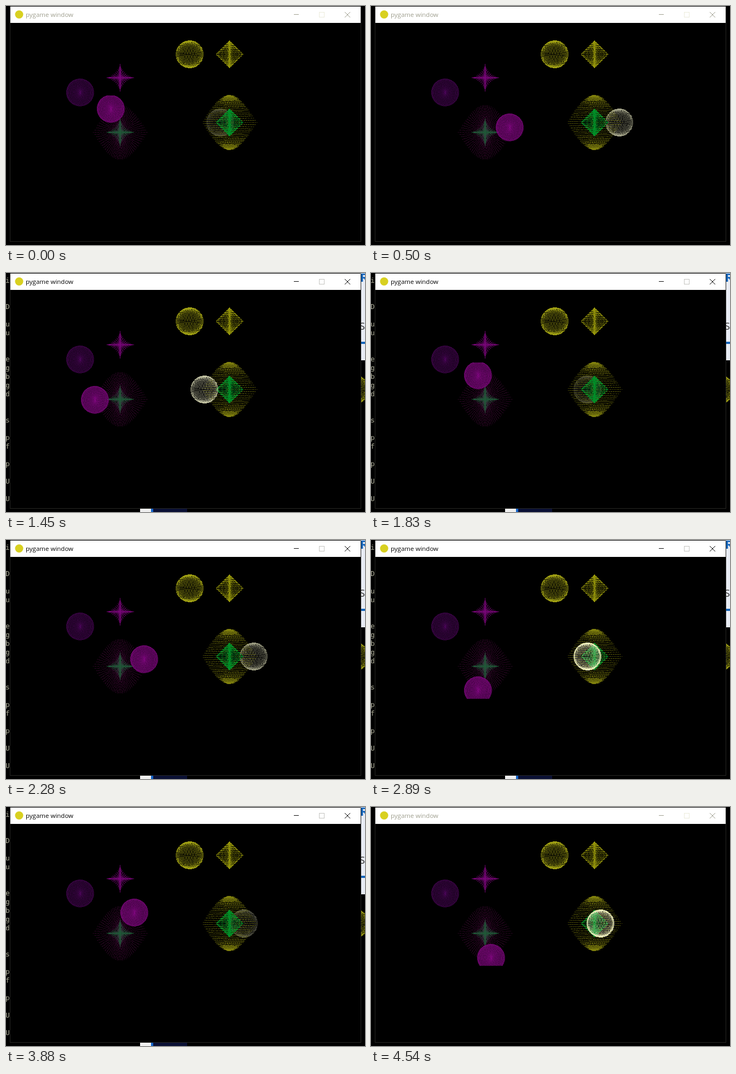
These frames come from a looping animation (656x438 px, 4.58 s). An HTML page with a canvas:

```html
<!DOCTYPE html>
<html lang="en">
<head>
<meta charset="utf-8">
<title>pygame window</title>
<style>
  html, body { margin: 0; width: 100%; height: 100%; overflow: hidden; background: #000; }
  canvas { display: block; }
</style>
</head>
<body>
<canvas id="stage" width="656" height="438"></canvas>
<script>
const LOOP = 4580, FOCUS = 1050, BLUR = 4020;
const ctx = document.getElementById('stage').getContext('2d');

const { sin, cos, asin, PI } = Math;
const linearCos = a => asin(cos(a)) * 2 / PI;
const linearSin = a => asin(sin(a)) * 2 / PI;

// Each solid pairs a profile over latitude with an outline over longitude.
const SPHERE = { lat: [cos, sin], lon: [cos, sin] };
const ROUNDED = { lat: [linearCos, sin], lon: [linearCos, sin] };
const GEM = { lat: [linearCos, linearSin], lon: [a => cos(a) ** 3, a => sin(a) ** 3] };

// Dots wound in a spiral around a solid, seen from the front or from above.
function cloud({ lat, lon }, r, color, { top = false, rows = 36, cols = 62, alpha = 0.75, fill = 0 } = {}) {
  const image = document.createElement('canvas');
  image.width = image.height = 2 * r + 4;
  const g = image.getContext('2d');
  g.translate(r + 2, r + 2);
  g.fillStyle = color;
  if (fill) {
    g.globalAlpha = fill;
    g.beginPath();
    g.arc(0, 0, r, 0, 2 * PI);
    g.fill();
  }
  g.globalAlpha = alpha;
  for (let i = 0; i < rows * cols; i++) {
    const v = (i / (rows * cols) - 0.5) * PI;
    const u = i / cols * 2 * PI;
    const ring = r * lat[0](v);
    const x = ring * lon[0](u);
    const y = top ? ring * lon[1](u) : r * lat[1](v);
    g.fillRect(Math.round(x), Math.round(y), 1, 1);
  }
  return image;
}

function put(image, x, y, alpha = 1) {
  ctx.globalAlpha = alpha;
  ctx.drawImage(image, Math.round(x - image.width / 2), Math.round(y - image.height / 2));
  ctx.globalAlpha = 1;
}

function rect(color, x, y, w, h) {
  ctx.fillStyle = color;
  ctx.fillRect(x, y, w, h);
}

function label(text, x, y, font, color) {
  ctx.font = font;
  ctx.fillStyle = color;
  ctx.fillText(text, x, y);
}

const shapes = {
  yellowBall: cloud(SPHERE, 25, '#a6a614', { cols: 60.4, alpha: 0.7 }),
  yellowGem: cloud(GEM, 25, '#98980c', { alpha: 0.6 }),
  bigFront: cloud(ROUNDED, 50, '#80800e', { rows: 40, cols: 72.3, alpha: 0.75 }),
  greenGem: cloud(GEM, 25, '#009028', { alpha: 0.75 }),
  whiteBall: cloud(SPHERE, 25, '#f0f0c8', { cols: 60.4, alpha: 0.6 }),
  violetBall: cloud(SPHERE, 25, '#580868', { top: true, cols: 60.4, alpha: 0.3, fill: 0.3 }),
  violetGem: cloud(GEM, 25, '#780878', { top: true, alpha: 0.45 }),
  bigTop: cloud(ROUNDED, 50, '#600c50', { top: true, rows: 40, cols: 72, alpha: 0.5 }),
  greenTop: cloud(GEM, 25, '#205838', { top: true, alpha: 0.5 }),
  purpleBall: cloud(SPHERE, 25, '#880888', { top: true, cols: 60.4, alpha: 0.4, fill: 0.5 })
};

function drawDesktop() {
  [...'i  D uu  egbgd  s pf p U U'].forEach((c, i) =>
    label(c, -1, 18 + 16 * i, '13px "DejaVu Sans Mono", monospace', '#a8a894'));
  rect('#e8ecf4', 648, 0, 8, 160);
  label('R', 647, 16, 'bold 22px "Open Sans", sans-serif', '#1464b8');
  label('S', 646, 104, '18px "Open Sans", sans-serif', '#303030');
  rect('#1464b8', 648, 126, 8, 4);
  put(shapes.yellowBall, 638, 213);
  rect('#f0f0f0', 245, 431, 20, 7);
  rect('#1464c8', 265, 431, 4, 7);
  rect('#0a1034', 269, 431, 62, 7);
}

function drawWindow(active) {
  rect('#000', 8, 1, 640, 430);
  ctx.strokeStyle = '#262622';
  ctx.lineWidth = 1;
  ctx.strokeRect(7.5, 1.5, 641, 430);
  rect('#fff', 8, 1, 640, 30);

  ctx.fillStyle = '#d8d020';
  ctx.beginPath();
  ctx.arc(24, 15.5, 7.5, 0, 2 * PI);
  ctx.fill();
  label('pygame window', 36, 20, '11.5px "Open Sans", sans-serif', active ? '#080808' : '#a0a090');

  ctx.strokeStyle = active ? '#080808' : '#a0a090';
  ctx.beginPath();
  ctx.moveTo(526, 15.5); ctx.lineTo(535, 15.5);
  ctx.moveTo(619, 11); ctx.lineTo(629, 21);
  ctx.moveTo(629, 11); ctx.lineTo(619, 21);
  ctx.stroke();
  ctx.strokeStyle = active ? '#c4c4c0' : '#ececdc';
  ctx.strokeRect(572.5, 11.5, 9, 9);
}

function drawTopView(dx, dy) {
  put(shapes.violetBall, 135, 158);
  put(shapes.violetGem, 208, 131);
  put(shapes.bigTop, 208, 231);
  put(shapes.greenTop, 208, 231);
  ctx.save();
  ctx.beginPath();
  ctx.rect(108, 164, 200, 127);
  ctx.clip();
  put(shapes.purpleBall, 208 + dx, 231 + dy);
  ctx.restore();
}

function drawFrontView(dx, depth) {
  const orbiter = () => put(shapes.whiteBall, 408 + dx, 213, Math.min(1, 0.84 + depth * 0.58));
  put(shapes.yellowBall, 335, 88);
  put(shapes.yellowGem, 408, 88);
  if (depth < 0) orbiter();
  put(shapes.bigFront, 408, 213);
  put(shapes.greenGem, 408, 213);
  if (depth >= 0) {
    orbiter();
    ctx.globalAlpha = depth * 0.6;
    ctx.strokeStyle = '#f4f4b8';
    ctx.lineWidth = 2.5;
    ctx.beginPath();
    ctx.arc(408 + dx, 213, 23.8, 0, 2 * PI);
    ctx.stroke();
    ctx.globalAlpha = 1;
  }
}

function draw(now) {
  const t = now % LOOP;
  const active = t >= FOCUS && t < BLUR;
  // The motion stalls briefly while the window takes focus.
  const clock = t >= 1010 && t < 1180 ? 1010 : t;
  const angle = (158 + 0.2 * clock) * PI / 180;
  const dx = -46 * sin(angle), depth = cos(angle);

  rect('#000', 0, 0, 656, 438);
  if (active) drawDesktop();
  drawWindow(active);
  drawTopView(dx, 46 * depth);
  drawFrontView(dx, depth);
  requestAnimationFrame(() => draw(performance.now()));
}

draw(performance.now());
</script>
</body>
</html>
```
